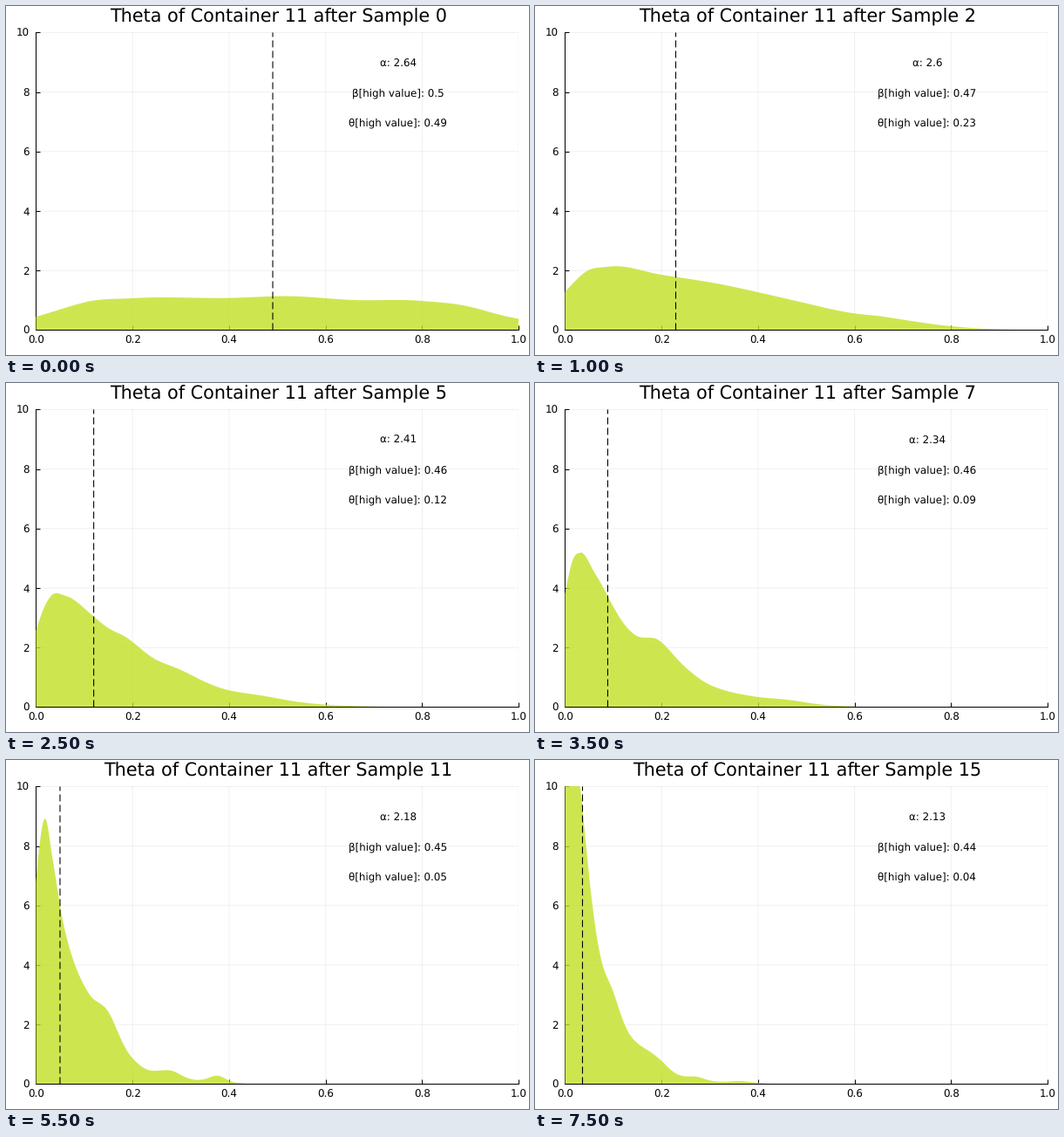
A matplotlib script that plays this animation: 600 by 400 pixels, repeating every 8 s.

```python
import numpy as np
import matplotlib.pyplot as plt
from matplotlib.animation import FuncAnimation
from matplotlib.patches import Polygon

W, H, DPI = 600, 400, 100
PX = 72 / DPI
SAMPLES = 16
LEFT, RIGHT, TOP, BOTTOM = 34.45, 588.2, 30.45, 371.45

plt.rcParams["font.family"] = "DejaVu Sans"
plt.rcParams["text.hinting"] = "none"

grid = np.linspace(0, 1, 801)
keys, stats, curves = [], [], []


def log_curve(points):
    """Cubic Hermite curve through the logs of a few heights."""
    x, y = np.array(points, float).T
    y = np.log(y)
    m = np.gradient(y, x, edge_order=2)
    m[-1] = (y[-1] - y[-2]) / (x[-1] - x[-2])
    i = np.clip(np.searchsorted(x, grid, side="right") - 1, 0, len(x) - 2)
    h = x[i + 1] - x[i]
    t = (grid - x[i]) / h
    inner = ((1 + 2 * t) * (1 - t) ** 2 * y[i] + t * (1 - t) ** 2 * h * m[i]
             + t * t * (3 - 2 * t) * y[i + 1] + t * t * (t - 1) * h * m[i + 1])
    tail = y[-1] + m[-1] * (grid - x[-1])
    return np.maximum(np.where(grid > x[-1], tail, inner), -9)


def posterior(n, theta, alpha, *points):
    keys.append(n)
    stats.append((1 / theta, alpha))
    curves.append(log_curve(points))


posterior(0, 0.4904, 2.64, (0, .45), (.1, .93), (.2, 1.07), (.4, 1.08),
          (.525, 1.14), (.66, 1.01), (.8, .98), (.9, .78), (1, .38))
posterior(2, 0.2294, 2.60, (0, 1.28), (.037, 1.89), (.09, 2.13), (.2, 1.86),
          (.35, 1.45), (.5, .9), (.6, .56), (.66, .45), (.8, .13), (1, .004))
posterior(4, 0.1449, 2.44, (0, 2.04), (.028, 2.98), (.06, 3.27), (.11, 3.1),
          (.172, 2.45), (.248, 1.67), (.3, 1.55), (.4, .7), (.5, .39),
          (.6, .16), (.8, .01))
posterior(7, 0.0885, 2.34, (0, 3.8), (.0135, 4.82), (.0315, 5.19),
          (.064, 4.44), (.149, 2.39), (.195, 2.24), (.2535, 1.28), (.3, .75),
          (.4, .34), (.474, .22), (.6, .02))
posterior(9, 0.0730, 2.37, (0, 4.62), (.01, 5.8), (.025, 6.55), (.0495, 5.73),
          (.091, 4.27), (.15, 2.34), (.232, 1.26), (.281, .69), (.335, .21),
          (.384, .25), (.45, .06), (.65, .015))
posterior(11, 0.0497, 2.18, (0, 6.8), (.018, 8.92), (.035, 7.5), (.0585, 5.26),
          (.11, 3.03), (.155, 2.28), (.2, .87), (.23, .49), (.285, .43),
          (.335, .14), (.38, .27), (.43, .02))
posterior(15, 0.0362, 2.13, (0, 10.2), (.012, 13), (.0315, 10), (.0785, 3.97),
          (.1, 3.1), (.131, 1.75), (.2, .78), (.2445, .27), (.272, .25),
          (.32, .08), (.364, .1), (.45, .006))

stats = np.array(stats)
areas = [np.exp(c).sum() for c in curves]


def density(n):
    """Each sample multiplies the density, so blend in log space."""
    j = min(np.searchsorted(keys, n, side="right") - 1, len(keys) - 2)
    t = (n - keys[j]) / (keys[j + 1] - keys[j])
    y = np.exp((1 - t) * curves[j] + t * curves[j + 1])
    return y * np.interp(n, keys, areas) / y.sum()


fig = plt.figure(figsize=(W / DPI, H / DPI), dpi=DPI, facecolor="white")
ax = fig.add_axes([LEFT / W, 1 - BOTTOM / H,
                   (RIGHT - LEFT) / W, (BOTTOM - TOP) / H])
ax.set(xlim=(0, 1), ylim=(0, 10),
       xticks=np.linspace(0, 1, 6), yticks=range(0, 11, 2))
ax.tick_params(direction="in", length=5 * PX, width=PX,
               labelbottom=False, labelleft=False)
ax.grid(color="black", alpha=0.06, linewidth=PX, snap=False)
ax.set_axisbelow(True)
for side in ("top", "right"):
    ax.spines[side].set_visible(False)
for side in ("left", "bottom"):
    ax.spines[side].set_linewidth(PX)


def label(x, baseline, text="", size=11.9, ha="center"):
    return fig.text(x / W, 1 - baseline / H, text, fontsize=size * PX,
                    ha=ha, va="baseline")


def px_x(v):
    return LEFT + v * (RIGHT - LEFT)


def px_y(v):
    return BOTTOM - v / 10 * (BOTTOM - TOP)


for v in np.linspace(0, 1, 6):
    label(px_x(v), 387.2, f"{v:.1f}")
for v in range(0, 11, 2):
    label(26.6, px_y(v) + 4.8, str(v), ha="right")

title = label(px_x(0.5) + 1, 18.4, size=20.75)
notes = [label(px_x(0.75), px_y(v) + 4.8) for v in (9, 8, 7)]
area = ax.add_patch(Polygon([(0, 0), (1, 0), (1, 1)], facecolor="#c1e024",
                            alpha=0.8, linewidth=0, zorder=3))
mark = ax.axvline(0.5, color="black", linewidth=1.1 * PX, zorder=4,
                  linestyle=(0, (7.27, 3.64)), dash_capstyle="butt",
                  snap=False)


def draw(n):
    inv_theta, alpha = (np.interp(n, keys, s) for s in stats.T)
    theta = 1 / inv_theta
    beta = 0.5 - 0.0187 * n ** 0.44
    outline = np.column_stack([grid, density(n)])
    area.set_xy(np.vstack([[0, 0], outline, [1, 0]]))
    mark.set_xdata([theta, theta])
    title.set_text(f"Theta of Container 11 after Sample {n}")
    values = (("α", alpha), ("β[high value]", beta), ("θ[high value]", theta))
    for note, (name, v) in zip(notes, values):
        note.set_text(f"{name}: {round(float(v), 2)}")
    return area, mark, title, *notes


anim = FuncAnimation(fig, draw, frames=SAMPLES, interval=500, repeat=True,
                     repeat_delay=0, blit=False)
plt.show()
```
